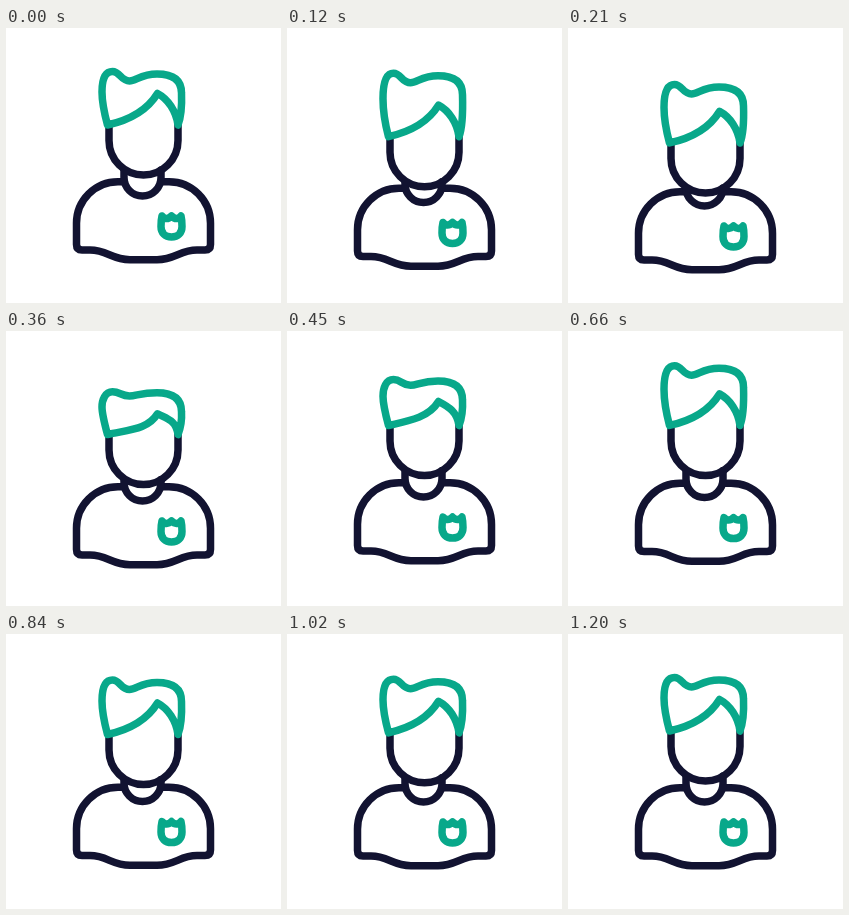
These frames come from a looping animation (275 px wide and 275 px high, 1870 ms). An HTML page:

```html
<!DOCTYPE html>
<html lang="en">
<head>
<meta charset="utf-8">
<title>Avatar nod</title>
<style>
html, body { margin: 0; width: 100%; height: 100%; overflow: hidden; background: #fff; }
svg { display: block; width: 100vw; height: 100vh; }
path { fill: none; stroke: #121331; stroke-width: 7.5; stroke-linecap: round; stroke-linejoin: round; }
.green { stroke: #08a88a; }
</style>
</head>
<body>
<svg viewBox="0 0 275 275">
  <g id="body">
    <path d="M118 153.7H112A41.5 41.5 0 0 0 70.5 195.2V216.5Q70.5 222 76 222H84C101 222 106 231.7 124 231.7H151C169 231.7 174 222 191 222H199Q204.5 222 204.5 216.5V195.2A41.5 41.5 0 0 0 163 153.7H155"/>
    <path class="green" d="M156 188Q160.5 193 165.5 188Q170.5 193 175 188C176 192 176 194 176 198.5C176 205 172 209 165.5 209S155 205 155 198.5C155 194 155 192 156 188Z"/>
  </g>
  <path id="neck"/>
  <path id="face" d="M103 96V112.5A34.5 34.5 0 0 0 172 112.5V96"/>
  <path id="hair" class="green"/>
</svg>
<script>
const LOOP = 1870, STEP = 30, END = 1200;
const $ = id => document.getElementById(id);

// turning points of each swing: [ms, offset]
const BODY = [[0, 0], [200, 10], [460, -2], [1000, 0]];
const HEAD = [[0, 0], [200, 18], [530, -6], [850, 3.5], [END, 0]];
const QUIFF = [[80, 0], [300, 20.5], [600, -10.5], [870, 3], [END, 0]];

function swing(points, t) {
  const i = points.findIndex(p => p[0] > t);
  if (i < 0) return points[points.length - 1][1];
  if (i === 0) return points[0][1];
  const [t0, y0] = points[i - 1], [t1, y1] = points[i];
  const u = (t - t0) / (t1 - t0);
  return y0 + (y1 - y0) * u * u * (3 - 2 * u);
}

// the quiff trails the head; when it catches up, the hair squashes
function hairPath(head, quiff) {
  const squash = Math.max(0, quiff - head);
  const shift = dy => y => y + dy;
  const h = shift(head), q = shift(quiff), d = shift(quiff - squash * 0.5),
    c = shift(quiff - squash * 0.15), f = shift(head + squash);
  return `M101.5 ${h(97)}C98 ${h(84)} 96 ${h(75)} 96 ${(h(64) + q(64)) / 2}`
    + `C96 ${q(52)} 99 ${q(43.5)} 106.5 ${q(43.5)}`
    + `C114 ${q(43.5)} 115 ${d(53)} 123.5 ${d(53)}`
    + `C130 ${d(53)} 135 ${c(46)} 151 ${c(46)}`
    + `C168 ${c(46)} 175.5 ${c(53)} 175.5 ${c(65)}`
    + `C176 ${(h(78) + c(78)) / 2} 175.5 ${h(88)} 172 ${h(97)}`
    + `C170 ${h(83)} 162 ${f(71)} 151.5 ${f(65.5)}`
    + `C142 ${f(81)} 124 ${h(92)} 101.5 ${h(97)}Z`;
}

function draw(time) {
  const t = Math.min(END, Math.floor(time % LOOP / STEP) * STEP);
  const body = swing(BODY, t), head = swing(HEAD, t), quiff = swing(QUIFF, t);
  $('body').setAttribute('transform', `translate(0 ${body})`);
  $('face').setAttribute('transform', `translate(0 ${head})`);
  const top = 142 + head, low = Math.max(top, 149.5 + body);
  const bottom = 168 + body;
  $('neck').setAttribute('d',
    `M118 ${top}V${low}A18.5 ${bottom - low} 0 0 0 155 ${low}V${top}`);
  $('hair').setAttribute('d', hairPath(head, quiff));
}

const start = performance.now();
function tick() {
  draw(performance.now() - start);
  requestAnimationFrame(tick);
}
tick();
</script>
</body>
</html>
```
